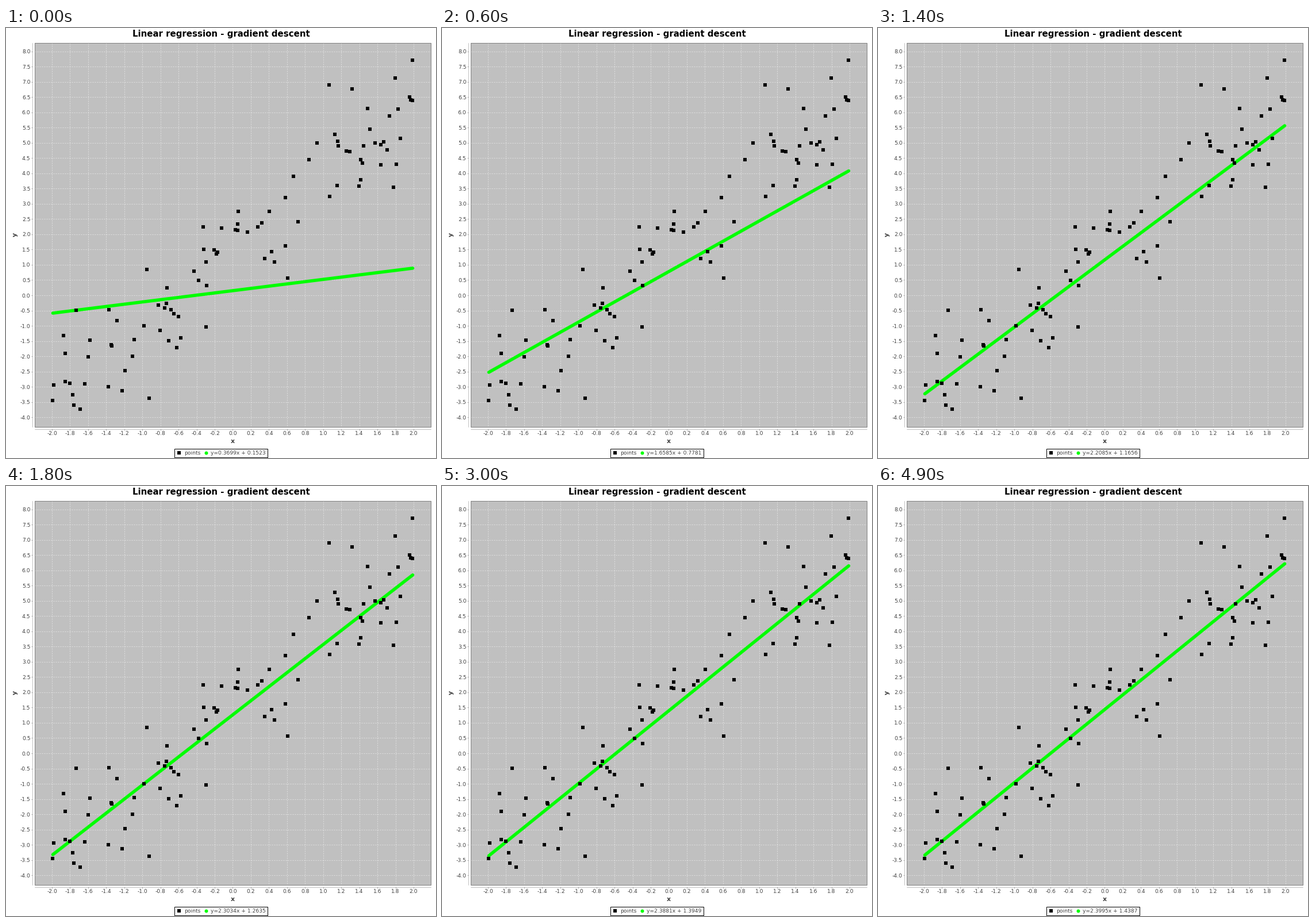
A matplotlib script that plays this animation: 748 by 748 pixels, repeating every 5000 ms.

```python
import matplotlib.pyplot as plt
import numpy as np
from matplotlib.animation import FuncAnimation
from matplotlib.patches import Rectangle

SIZE, DPI = 748, 64
PX = 72 / DPI  # one pixel in points
FRAMES, INTERVAL = 50, 100
DARK, GREEN = "#404040", "#00ff00"

# Scatter positions on the stage, in pixels
POINT_X = [
    707.5, 677, 562, 602, 702, 704.5, 707, 629.5, 682.5, 667.5, 633, 572,
    686.5, 577, 541, 642.5, 657, 652, 578.5, 622, 592, 598.5, 663, 527,
    617, 620.5, 652, 679, 500, 617.5, 576.5, 614.5, 674, 563.5, 486.5, 404.5,
    458, 508, 403.5, 445.5, 438.5, 399, 403.5, 420.5, 343, 375.5, 486, 344.5,
    362, 368.5, 366, 462.5, 450.5, 467, 348, 245, 327, 335, 490.5, 349,
    280, 279, 265.5, 276, 287.5, 292, 300, 122, 179, 193.5, 240, 348.5,
    268, 100.5, 304.5, 146.5, 223, 283, 297.5, 183.5, 184.5, 103.5, 143.5, 220.5,
    207, 83.5, 103.5, 111.5, 137, 178, 202, 116.5, 81.5, 249, 118.5, 129.5,
]
POINT_Y = [
    56, 87, 99, 106, 120, 125, 126, 140, 141, 153, 175.5, 185,
    192, 197, 200, 199.5, 198, 203, 204.5, 204.5, 214, 215, 212, 228.5,
    228.5, 235, 237.5, 237, 258, 264, 273.5, 275, 276.5, 292.5, 295, 319,
    319, 336.5, 341, 338.5, 346, 351, 352, 355, 345.5, 348, 379, 385,
    386, 389.5, 392.5, 389, 401, 406.5, 406.5, 419.5, 422.5, 438.5, 435, 448,
    452, 478.5, 481.5, 487, 489.5, 496.5, 501.5, 490.5, 489.5, 509, 518, 520,
    525.5, 535, 539, 543, 542, 544, 555.5, 551, 553, 566, 572, 570.5,
    595.5, 620.5, 614.5, 618, 619, 624, 630.5, 637.5, 648, 643.5, 656, 663,
]


def to_x(value):
    return 394.5 + 157.25 * value


def to_y(value):
    return 465 - 53.05 * value


def descend(steps, rate=0.1):
    """Slope and intercept after some steps of batch gradient descent."""
    mean_x, mean_xx, mean_y, mean_xy = 0.0321, 1.5219, 1.52255, 3.6986
    slope = intercept = 0.0
    for _ in range(steps):
        grad_slope = mean_xx * slope + mean_x * intercept - mean_xy
        grad_intercept = mean_x * slope + intercept - mean_y
        slope -= rate * grad_slope
        intercept -= rate * grad_intercept
    return slope, intercept


plt.rcParams["font.family"] = "DejaVu Sans"
fig = plt.figure(figsize=(SIZE / DPI, SIZE / DPI), dpi=DPI, facecolor="white")
ax = fig.add_axes([0, 0, 1, 1])
ax.set(xlim=(0, SIZE), ylim=(SIZE, 0))
ax.axis("off")


def label(x, y, text, size=9.15, color=DARK, ha="center", **kwargs):
    return ax.text(x, y, text, fontsize=size * PX, color=color, ha=ha,
                   va=kwargs.pop("va", "baseline"), **kwargs)


def stroke(xs, ys, color, width=0.5, **kwargs):
    return ax.plot(xs, ys, color=color, lw=width * PX, **kwargs)[0]


def marker(xs, ys, shape, color, size=6, **kwargs):
    ax.plot(xs, ys, shape, color=color, ms=size * PX, mew=0, **kwargs)


def box(left, top, right, bottom, **kwargs):
    ax.add_patch(Rectangle((left, top), right - left, bottom - top, **kwargs))


LEFT, TOP, RIGHT, BOTTOM = 50.5, 25.5, 739.5, 693.5
GRID = dict(color="white", linestyle=(0, (4, 4)), zorder=2)

box(LEFT, TOP, RIGHT, BOTTOM, fc="#c0c0c0", ec="none", zorder=1)
stroke([46.5, 46.5], [TOP, BOTTOM], "gray")
stroke([LEFT, RIGHT], [697.5, 697.5], "gray")

for value in np.arange(-10, 11) / 5:
    x = to_x(value)
    stroke([x, x], [TOP, BOTTOM], **GRID)
    stroke([x, x], [697, 699.5], "gray")
    label(x, 708, f"{value:.1f}")

for value in np.arange(-8, 17) / 2:
    y = to_y(value)
    stroke([LEFT, RIGHT], [y, y], **GRID)
    stroke([44, 46.5], [y, y], "gray")
    label(42.5, y + 3.5, f"{value:.1f}", ha="right")

box(LEFT, TOP, RIGHT, BOTTOM, fc="none", ec="gray", lw=PX, zorder=3)

label(374, 15, "Linear regression - gradient descent", 15.05, "black", weight="bold")
label(394.5, 722, "x", 11, weight="bold")
label(16, 359, "y", 11, weight="bold", rotation=90, va="center")

LINE_X = np.array([81.5, 707.5])
fit = stroke(LINE_X, [0, 0], GREEN, 5.6, solid_capstyle="round", zorder=4)
marker(POINT_X, POINT_Y, "s", "black", zorder=5)

box(293.5, 731.5, 455.5, 746.5, fc="white", ec="black", lw=PX)
marker([301], [739], "s", "black")
label(310, 742, "points", ha="left")
marker([348.5], [739], "o", GREEN)
equation = label(356.5, 742, "", ha="left")


def update(frame):
    slope, intercept = descend(frame + 1)
    values = slope * (LINE_X - to_x(0)) / 157.25 + intercept
    fit.set_ydata(to_y(values))
    equation.set_text(f"y={slope:.4f}x + {intercept:.4f}")
    return fit, equation


anim = FuncAnimation(fig, update, frames=FRAMES, interval=INTERVAL,
                     repeat=True, repeat_delay=0)
plt.show()
```
